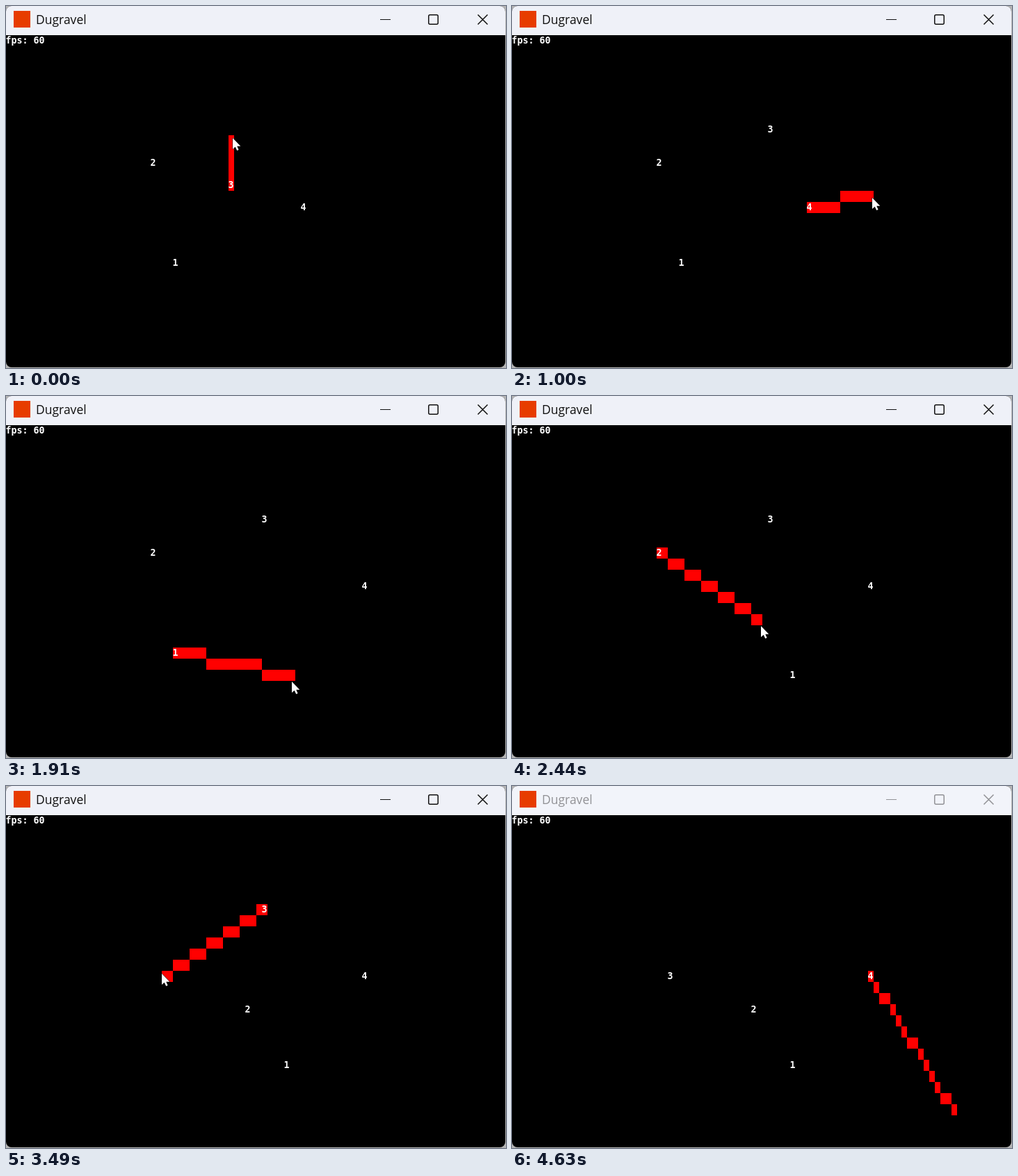
These frames come from a looping animation (719 by 521 pixels, 4.68 s). An HTML page with a canvas:

```html
<!DOCTYPE html>
<html lang="en">
<head>
<meta charset="utf-8">
<style>
  html, body { margin: 0; width: 100%; height: 100%; overflow: hidden; background: #b4b4b4; }
  canvas { display: block; }
</style>
</head>
<body>
<canvas width="719" height="521"></canvas>
<script>
const ctx = document.querySelector('canvas').getContext('2d');
const LOOP = 4680, TICK = 50, INACTIVE_FROM = 4630;
const CELL_W = 8, CELL_H = 16, TOP = 42, COLS = 80;

// Mouse moves; a move with "grab" drops the held digit and fetches another on the way.
const move = (start, end, x, y, grab) => ({ start, end, to: [x, y], grab });
const moves = [
  move(30, 230, 371, 180),
  move(610, 1000, 518, 276, 4),
  move(1470, 1910, 411, 411, 1),
  move(2190, 2190, 404, 408),
  move(2240, 2440, 358, 331, 2),
  move(2620, 2680, 351, 329),
  move(2850, 2950, 201, 343, 3),
  move(3200, 3490, 224, 270),
  move(3640, 3880, 501, 318, 4),
  move(3920, 4020, 519, 396),
  move(4040, 4130, 588, 476),
  move(4190, 4630, 684, 546),
];

const cellAt = ([x, y]) => [Math.floor(x / CELL_W), Math.floor((y - TOP - 2) / CELL_H)];
const pointOf = ([col, row]) => [col * CELL_W, row * CELL_H + TOP + 2];

// Position at u (0 to 1) on a path whose segments take equal time.
function along(path, u) {
  const segments = path.length - 1;
  const i = Math.min(segments - 1, Math.floor(u * segments));
  const [a, b] = [path[i], path[i + 1]];
  return a.map((v, axis) => v + (b[axis] - v) * (u * segments - i));
}

function stateAt(t) {
  const digits = { 1: [30, 20], 2: [26, 11], 3: [40, 13], 4: [53, 15] };
  let held = 3, cursor = [326, 190], aim = cursor;
  for (const { start, end, to, grab } of moves) {
    if (t < start) break;
    const steps = 1 + Math.round((end - start) / TICK);
    const elapsed = (t - start) / (end - start || 1);
    const step = Math.min(steps, 1 + Math.floor(elapsed * (steps - 1) + 1e-6));
    const u = steps === 1 ? 1 : step / steps;
    const path = [cursor, to];
    if (grab) {
      digits[held] = cellAt(cursor);
      path.splice(1, 0, pointOf(digits[grab]));
      held = u > 0.5 ? grab : 0;
    }
    cursor = along(path, u);
    aim = u < 1 ? along(path, u - 0.5 / steps) : cursor; // the game trails the pointer
  }
  return { digits, held, cursor, aim };
}

function drawLine([c0, r0], [c1, r1]) {
  const n = Math.max(Math.abs(c1 - c0), Math.abs(r1 - r0), 1);
  ctx.fillStyle = '#f00';
  for (let i = 0; i <= n; i++) {
    const col = Math.round(c0 + (c1 - c0) * i / n), row = Math.round(r0 + (r1 - r0) * i / n);
    if (col < COLS) ctx.fillRect(col * CELL_W, TOP + row * CELL_H, CELL_W, CELL_H);
  }
}

function drawText(text, [col, row]) {
  ctx.font = 'bold 13.3px "DejaVu Sans Mono", monospace';
  ctx.fillStyle = '#fff';
  ctx.fillText(text, col * CELL_W - 0.6, TOP + row * CELL_H + 12);
}

function drawTitleBar(active) {
  const ink = active ? '#111' : '#929296';
  ctx.fillStyle = active ? '#eff1f8' : '#f2f4fa';
  ctx.fillRect(0, 0, 718, TOP);
  ctx.fillStyle = '#e73c00';
  ctx.fillRect(11, 7, 24, 24);
  ctx.fillStyle = ink;
  ctx.font = '17.5px "Open Sans", sans-serif';
  ctx.fillText('Dugravel', 43, 26);

  ctx.fillRect(538, 19, 15, 1);
  ctx.strokeStyle = ink;
  ctx.lineWidth = 1.5;
  ctx.beginPath();
  ctx.roundRect(607.75, 12.75, 13.5, 13.5, 2);
  ctx.moveTo(678.5, 12.5); ctx.lineTo(692.5, 26.5);
  ctx.moveTo(692.5, 12.5); ctx.lineTo(678.5, 26.5);
  ctx.stroke();
}

const arrow = new Path2D('M0 0V16L3.7 12.7L6.2 18L8.6 17L6.3 11.7H11.3Z');
function drawCursor([x, y]) {
  ctx.save();
  ctx.translate(Math.round(x), Math.round(y));
  ctx.lineWidth = 1;
  ctx.strokeStyle = '#000';
  ctx.fillStyle = '#fff';
  ctx.stroke(arrow);
  ctx.fill(arrow);
  ctx.restore();
}

function draw(t) {
  const { digits, held, cursor, aim } = stateAt(t);
  ctx.clearRect(0, 0, 719, 521);
  ctx.save();
  ctx.beginPath();
  ctx.roundRect(0, 0, 718, 520, 8);
  ctx.clip();
  ctx.fillStyle = '#000';
  ctx.fillRect(0, 0, 719, 521);
  drawTitleBar(t < INACTIVE_FROM);
  drawText('fps: 60', [0, 0]);
  if (held) drawLine(digits[held], cellAt(aim));
  for (const n in digits) drawText(n, digits[n]);
  ctx.restore();
  drawCursor(cursor);
}

const begin = performance.now();
function tick() {
  draw((performance.now() - begin) % LOOP);
  requestAnimationFrame(tick);
}
tick();
</script>
</body>
</html>
```
